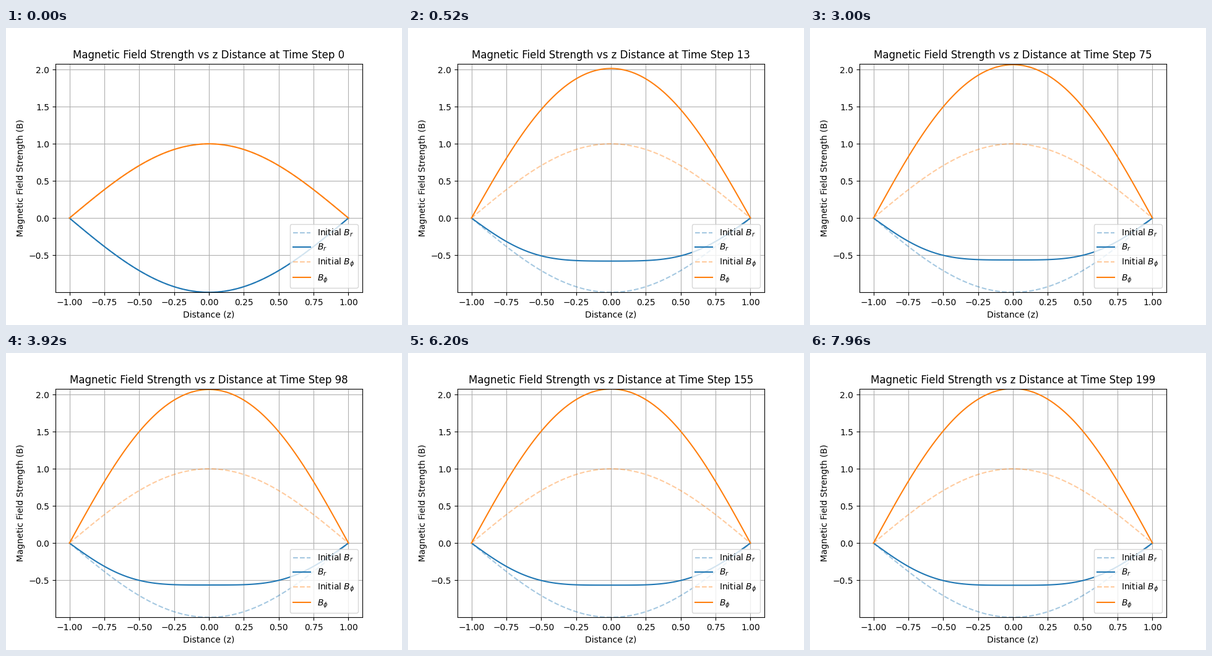
A matplotlib script for the animation above (8 s loop, 640 px wide and 480 px high).

```python
import numpy as np
import matplotlib.pyplot as plt
from matplotlib.animation import FuncAnimation

STEPS = 200
DT = 0.05
SHEAR = 8.12
ALPHA = 8.07 / SHEAR  # dynamo number just above critical

z = np.linspace(-1, 1, 100)
dz = z[1] - z[0]


def simulate():
    """Alpha-omega dynamo, Crank-Nicolson diffusion, fields zero at z = -1, 1."""
    n = len(z) - 2
    up, down = np.eye(n, k=1), np.eye(n, k=-1)
    grad = (up - down) / (2 * dz)
    half = DT / 2 * (up - 2 * np.eye(n) + down) / dz**2
    inverse = np.linalg.inv(np.eye(n) - half)
    diffuse = inverse @ (np.eye(n) + half)
    induce = DT * inverse @ (ALPHA * np.sin(np.pi * z[1:-1])[:, None] * grad)
    stretch = -DT * SHEAR * inverse

    br = np.zeros((STEPS, len(z)))
    bphi = np.zeros_like(br)
    bphi[0] = np.cos(np.pi * z / 2)
    br[0] = -bphi[0]
    for i in range(1, STEPS):
        r, p = br[i - 1, 1:-1], bphi[i - 1, 1:-1]
        r = diffuse @ r + induce @ p
        br[i, 1:-1] = r
        bphi[i, 1:-1] = diffuse @ p + stretch @ r
    return br, bphi


br, bphi = simulate()

fig, ax = plt.subplots(figsize=(6.4, 4.8), dpi=100)


def add_pair(field, name, color):
    ax.plot(z, field[0], "--", color=color, alpha=0.4, label=f"Initial {name}")
    return ax.plot(z, field[0], color=color, label=name)[0]


br_line = add_pair(br, "$B_r$", "tab:blue")
bphi_line = add_pair(bphi, r"$B_\phi$", "tab:orange")

ax.set_ylim(br[0].min(), 2.08)
ax.set_xlabel("Distance (z)")
ax.set_ylabel("Magnetic Field Strength (B)")
ax.grid(True)
ax.legend(loc="lower right")
title = ax.set_title("")


def update(step):
    br_line.set_ydata(br[step])
    bphi_line.set_ydata(bphi[step])
    title.set_text(f"Magnetic Field Strength vs z Distance at Time Step {step}")
    return br_line, bphi_line, title


anim = FuncAnimation(fig, update, frames=STEPS, interval=40, repeat=True)
plt.show()
```
